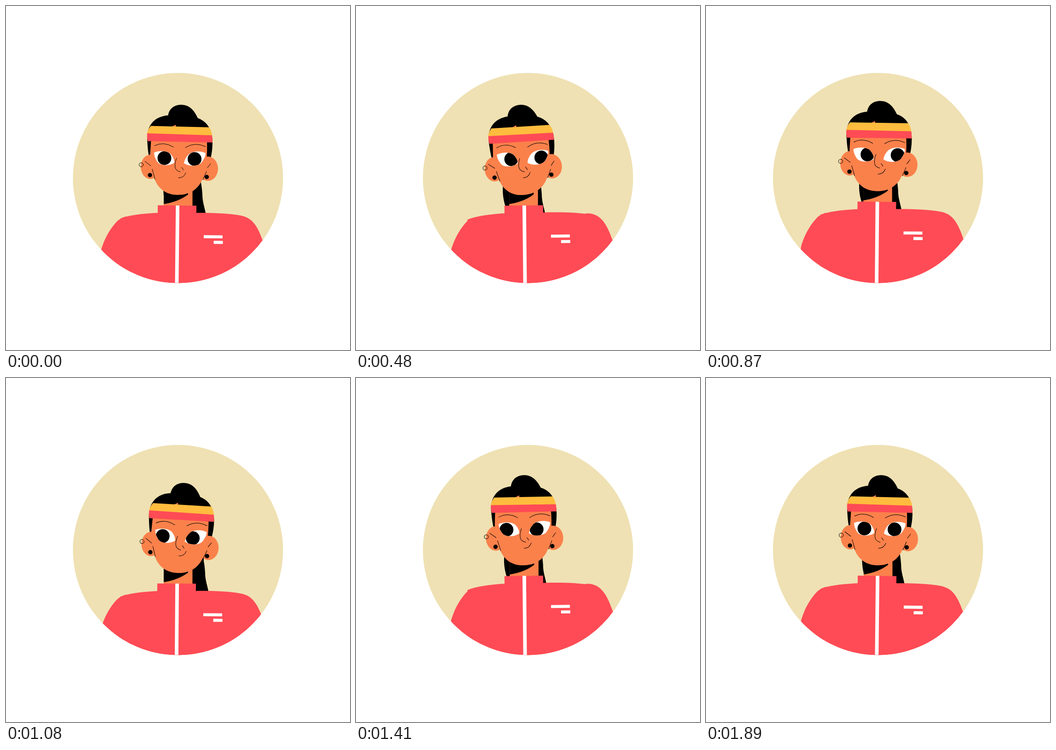
An HTML page that plays this animation: 748 px wide and 748 px high, repeating every 1.92 s.

```html
<!DOCTYPE html>
<html lang="en">
<head>
<meta charset="utf-8">
<title>Portrait</title>
<style>
html, body { margin: 0; width: 100%; height: 100%; overflow: hidden; background: #fff; }
svg { display: block; width: 100vw; height: 100vh; }
.skin { fill: #fb814b; }
.red { fill: #ff4b55; }
.white { fill: #fff; }
.line { fill: none; stroke: #000; stroke-width: 1; stroke-linecap: round; }
</style>
</head>
<body>
<svg viewBox="0 0 748 748">
  <defs>
    <clipPath id="disc"><circle cx="374" cy="374" r="228.5"/></clipPath>
    <path id="leafL" d="M322 319C335 313 352 316 358 322C363 328 366 334 366 341C355 349 335 348 329 339C325 333 322 326 322 319Z"/>
    <path id="leafR" d="M434 320C421 314 405 316 397 323C391 329 388 336 387 342C398 350 418 349 425 341C430 334 434 327 434 320Z"/>
    <clipPath id="lidL"><use class="lid" href="#leafL"/></clipPath>
    <clipPath id="lidR"><use class="lid" href="#leafR"/></clipPath>
  </defs>
  <circle cx="374" cy="374" r="228.5" fill="#efe1b3"/>
  <g clip-path="url(#disc)">
    <path id="tail" d="M-37 350V377C-42 395 -41 425 -28 450L-18 466H54L52 450C49 435 45 425 45 410Q44 395 42 385V350Z"/>
    <g id="neck">
      <path class="skin" d="M343 380H405.5V442H343Z"/>
      <path d="M343 380H396V410Q375 426 343 431Z"/>
    </g>
    <path id="arms" class="red"/>
    <g id="torso">
      <path class="red" d="M326.4 434H410.4V449.6C445 449 485 450 510 455Q518 457 524 461L540 640H215L246 463.3C268 455 300 452 326.4 450.5Z"/>
      <path class="white" d="M365.6 434h7.8v200h-7.8zM427 498h41v6.6h-41zM448.7 510h20v6.6h-20z"/>
    </g>
    <g id="head">
      <path d="M352 241C354 223 366 215 381 215C398 215 409 226 417 244C440 252 449 273 449 297C449 315 446 330 441 345L425 350H325L313 337C309 322 308 308 307 290C306 265 318 241 352 238Z"/>
      <g class="skin">
        <ellipse cx="314" cy="350" rx="21" ry="26.5"/>
        <ellipse cx="439" cy="354" rx="22" ry="26.5"/>
        <path d="M315.5 292L313 330C314 350 319 370 327 385C339 406 358 411 374 411C400 411 419 398 428 375C436 350 438 325 437 294Z"/>
      </g>
      <path d="M315 261L442 264Q447 272 448 282L307 278Q308 269 315 261Z" fill="#ffbc3e"/>
      <path class="red" d="M307 277L448 281.5Q449 289 449 297L308 294Q306 286 307 277Z"/>
      <path class="skin" d="M361 262.2L369.5 258.5V262.4Z"/>
      <use class="lid white" href="#leafL"/>
      <use class="lid white" href="#leafR"/>
      <g clip-path="url(#lidL)"><circle class="pupil" cx="344.5" cy="331" r="15"/></g>
      <g clip-path="url(#lidR)"><circle class="pupil" cx="410" cy="333" r="15"/></g>
      <path class="line" d="M323 304Q343 294 364 307M390 308Q411 295 434 306M371 331C367 340 366 351 370 356Q374 360 379 361M382 351L386 357M375 374Q387 374 391 363M302 338L315 348M318 355L324 377M445 343L438 352M436 360L428 378"/>
      <circle class="line" cx="294" cy="345.5" r="4.5"/>
      <circle cx="313" cy="368" r="4.7"/>
      <circle cx="436.5" cy="372" r="4.7"/>
    </g>
  </g>
</svg>
<script>
const LOOP = 1920, STEP = 30, SWAY = 960, BEAT = 480;
const $ = id => document.getElementById(id);
const all = name => document.querySelectorAll('.' + name);
const set = (el, value) => el.setAttribute('transform', value);
const wave = (t, peak) => Math.cos((t - peak) / SWAY * 2 * Math.PI);

// Head tilt in degrees at [ms, angle] keys
const tilts = [[0, 1.86], [130, 3.2], [480, -3], [640, -2.4], [870, 1.4],
               [1080, 3.95], [1410, -.7], [1620, -1.4], [1890, 1.87]];

function tiltKey(i) {
  const n = tilts.length, turn = Math.floor(i / n);
  const [t, a] = tilts[i - turn * n];
  return [t + turn * LOOP, a];
}

// Smooth curve through the keys, closed over the loop
function tilt(t) {
  let i = tilts.length - 1;
  while (tilts[i][0] > t) i--;
  const [p, q, r, s] = [-1, 0, 1, 2].map(k => tiltKey(i + k));
  const span = r[0] - q[0], u = (t - q[0]) / span;
  const m = (r[1] - p[1]) / (r[0] - p[0]) * span;
  const n = (s[1] - q[1]) / (s[0] - q[0]) * span;
  return q[1] + u * (m + u * (3 * (r[1] - q[1]) - 2 * m - n + u * (m + n - 2 * (r[1] - q[1]))));
}

function ease(t, from, to) {
  const u = Math.min(1, Math.max(0, (t - from) / (to - from)));
  return u * u * (3 - 2 * u);
}

// Vertical offset of the body: a hop on every beat
function hop(t) {
  const a = ((t - 120 + BEAT) % BEAT) / BEAT * Math.PI;
  return 13 - 11 * (Math.sin(a) + (1 - Math.cos(2 * a)) / 2);
}

function draw(t) {
  const c = wave(t, 0), dx = 3.7 * (c - 1), dy = hop(t), turn = tilt(t) - 1.86;
  set($('tail'), `translate(${370.5 + 17.5 * wave(t, 130)} ${dy})`);
  set($('neck'), `translate(${dx + turn / 2} ${dy})`);
  set($('arms'), `translate(0 ${dy})`);
  $('arms').setAttribute('d', `M206 536L207 530C215 503 228 483 240 470Q246 463 260 ${459 - c}L380 470L500 ${454 + 2.5 * c}C530 ${452 + 3 * c} 545 472 558 510L570 550V640H195V580Z`);
  set($('torso'), `translate(0 ${dy}) rotate(${.6 * c} 369.4 785)`);
  set($('head'), `translate(${dx} ${dy}) rotate(${turn} 374.7 421)`);

  const gaze = 8 * ease(t, 240, 400) - 14 * ease(t, 900, 1060) + 6 * ease(t, 1450, 1600);
  all('pupil').forEach(el => set(el, `translate(${gaze} ${gaze < 0 ? 1 : 0})`));

  const near = Math.min(1, Math.abs(t - 1680) / 90);
  const open = 1 - .48 * (1 + Math.cos(near * Math.PI));
  all('lid').forEach(el => set(el, `translate(0 ${332 * (1 - open)}) scale(1 ${open})`));
}

const start = performance.now();
function tick() {
  const t = (performance.now() - start) % LOOP;
  draw(Math.floor(t / STEP) * STEP);
  requestAnimationFrame(tick);
}
tick();
</script>
</body>
</html>
```
